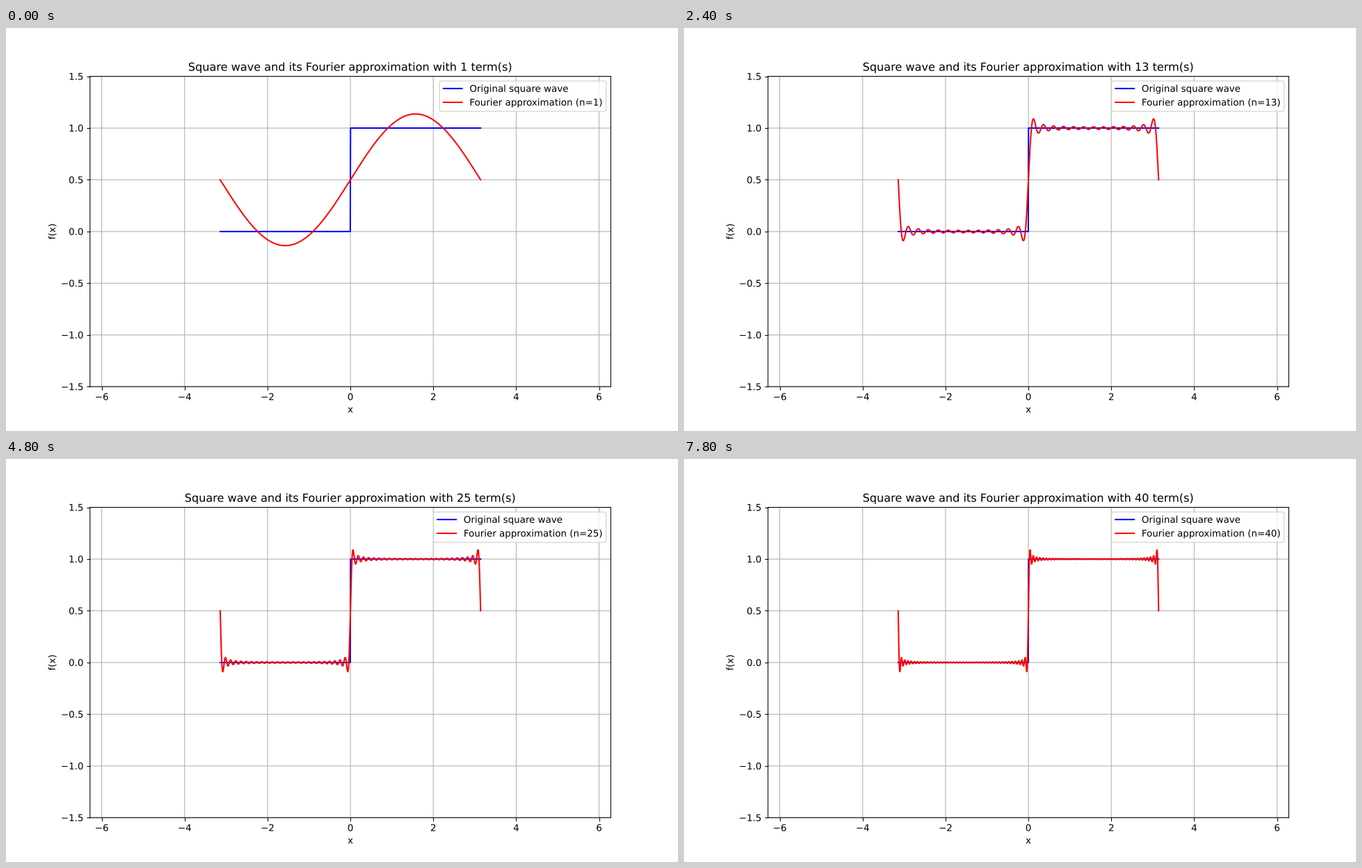
Write a matplotlib script that moves like this. It is 966x580 px and loops after 8 s.

```python
import numpy as np
import matplotlib.pyplot as plt
from matplotlib.animation import FuncAnimation
from matplotlib.patheffects import Normal

DPI = 96.6
WIDTH, HEIGHT = 966, 580
TERMS = 40

# smooth, unsnapped lines and outline text at fractional pixel positions
plt.rcParams.update({
    "path.snap": False,
    "path.effects": [Normal()],
    "text.hinting": "no_hinting",
    "legend.labelspacing": 0.54,
    "legend.borderpad": 0.42,
})

x = np.linspace(-np.pi, np.pi, 1000)
square = np.where(x < 0, 0.0, 1.0)


def fourier(n):
    """Partial sum with the first n odd harmonics."""
    k = 2 * np.arange(n)[:, None] + 1
    return 0.5 + 2 / np.pi * (np.sin(k * x) / k).sum(axis=0)


# the tiny margin keeps the pixel size from rounding down
fig, ax = plt.subplots(figsize=((WIDTH + 1e-6) / DPI, (HEIGHT + 1e-6) / DPI), dpi=DPI)
ax.plot(x, square, color="blue", label="Original square wave")
approx, = ax.plot(x, fourier(1), color="red")
ax.set_xlim(-2 * np.pi, 2 * np.pi)
ax.set_ylim(-1.5, 1.5)
ax.set_xlabel("x")
ax.set_ylabel("f(x)")
ax.grid(True)


def update(i):
    n = i + 1
    approx.set_ydata(fourier(n))
    approx.set_label(f"Fourier approximation (n={n})")
    ax.set_title(f"Square wave and its Fourier approximation with {n} term(s)")
    ax.legend(loc="upper right")
    return approx,


anim = FuncAnimation(fig, update, frames=TERMS, interval=200,
                     repeat=True, repeat_delay=0, blit=False)
plt.show()
```
